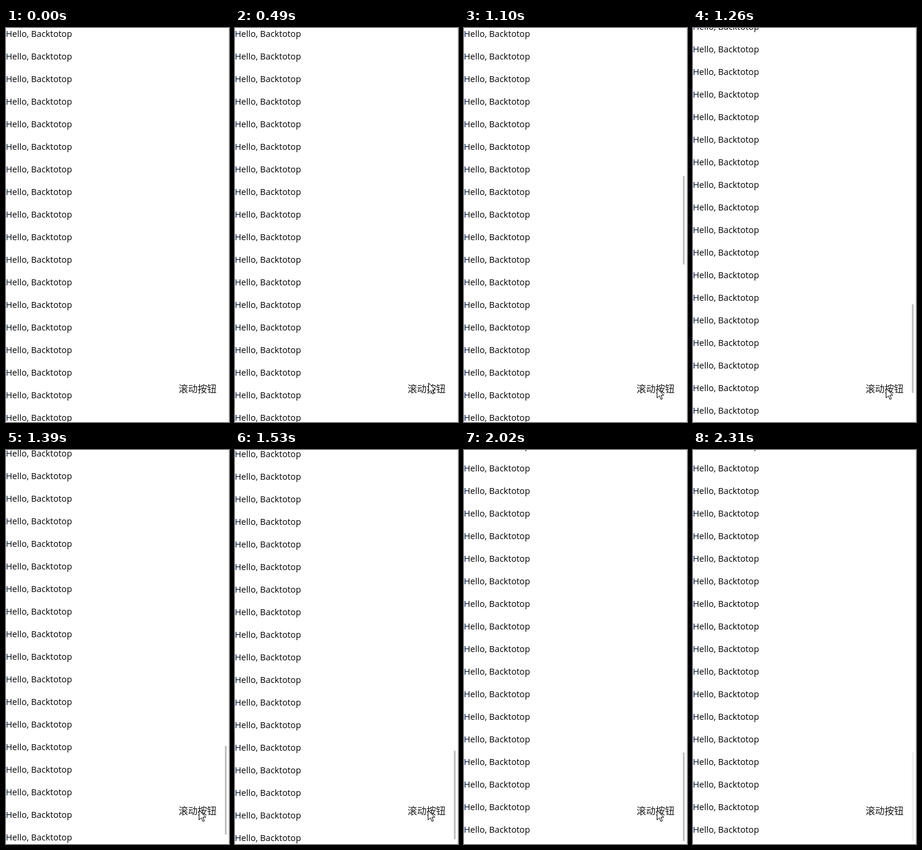
Animation of 376x663 px, one loop 3300 ms. Source, as an HTML page with a canvas:

```html
<!DOCTYPE html>
<html lang="zh">
<head>
<meta charset="utf-8">
<title>Back to top</title>
<style>
  html, body { margin: 0; width: 376px; height: 663px; overflow: hidden; background: #fff; }
  canvas { display: block; }
</style>
</head>
<body>
<canvas id="stage" width="376" height="663"></canvas>
<script>
const W = 376, H = 663, LOOP = 3300;
const ROW = 38, ROWS = 77, MAX_SCROLL = 2259;
const SCROLL_START = 1042.7, SCROLL_END = 1790;
const FRAME = 32.8, TICK = 10;
const ctx = document.getElementById('stage').getContext('2d');
const arrow = new Path2D('M0 0V16L4 12.5L6.5 18.5L9 17.5L6.5 11.5H11.5Z');

const mix = (a, b, p) => a + (b - a) * p;
const progress = (t, from, to) => Math.min(1, Math.max(0, (t - from) / (to - from)));
const floorTick = t => Math.floor(t / TICK) * TICK;

// The scroll advances at about 30 fps on a 10 ms clock.
function frameTime(t) {
  const phase = 1103.5;
  const n = Math.ceil((floorTick(t) + TICK - phase) / FRAME) - 1;
  return floorTick(phase + n * FRAME);
}

// Exponential ease-out whose rate slackens slowly.
function scrollAt(t) {
  if (t >= SCROLL_END) return MAX_SCROLL;
  const s = Math.max(0, t - SCROLL_START);
  return MAX_SCROLL - Math.round(MAX_SCROLL * Math.exp(-0.01182 * s + 2.55e-6 * s * s));
}

function drawRows(scroll) {
  ctx.font = '14.6px "Open Sans", "Noto Sans", sans-serif';
  ctx.fillStyle = '#000';
  for (let i = 0; i < ROWS; i++) {
    const y = i * ROW + 15 - scroll;
    if (y > -8 && y < H + 16) ctx.fillText('Hello, Backtotop', -0.2, y);
  }
  // bluish subpixel edge on the first stem
  ctx.globalCompositeOperation = 'lighten';
  ctx.fillStyle = '#004a90';
  ctx.fillRect(0, 0, 2, H);
  ctx.globalCompositeOperation = 'source-over';
}

function drawButton() {
  ctx.font = '300 16px "Noto Sans CJK SC", "Noto Sans CJK", sans-serif';
  ctx.fillStyle = '#1a1a1a';
  ctx.fillText('滚动按钮', 291, 613);
}

function drawThumb(t, scroll) {
  if (!scroll) return;
  ctx.globalAlpha = mix(1, 0.24, progress(t, 2160, 2310));
  ctx.fillStyle = '#c1c1c1';
  ctx.fillRect(369, Math.round(1.4 + scroll * 0.2247), 3, 149);
  ctx.globalAlpha = 1;
}

function drawPointer(t) {
  if (t < 200 || t >= 2200) return;
  const rise = 1 - (1 - progress(t, 200, 490)) ** 2;
  const settle = progress(t, 690, 800);
  const leave = progress(t, 2020, 2200) ** 2;
  const x = 316 + 10 * rise - settle + 6 * leave;
  const y = 654 - 57 * rise + 9 * settle + 58 * leave;
  ctx.save();
  ctx.translate(Math.round(x) + 0.5, Math.round(y) + 0.5);
  ctx.fillStyle = '#fff';
  ctx.fill(arrow);
  ctx.strokeStyle = '#000';
  ctx.stroke(arrow);
  ctx.restore();
}

function draw(t) {
  const scroll = scrollAt(frameTime(t));
  ctx.fillStyle = '#fff';
  ctx.fillRect(0, 0, W, H);
  drawRows(scroll);
  ctx.fillStyle = '#e5e5e5';
  ctx.fillRect(375, 0, 1, H);
  drawButton();
  drawThumb(t, scroll);
  drawPointer(t);
}

const start = performance.now();
function tick() {
  draw((performance.now() - start) % LOOP);
  requestAnimationFrame(tick);
}
tick();
</script>
</body>
</html>
```
